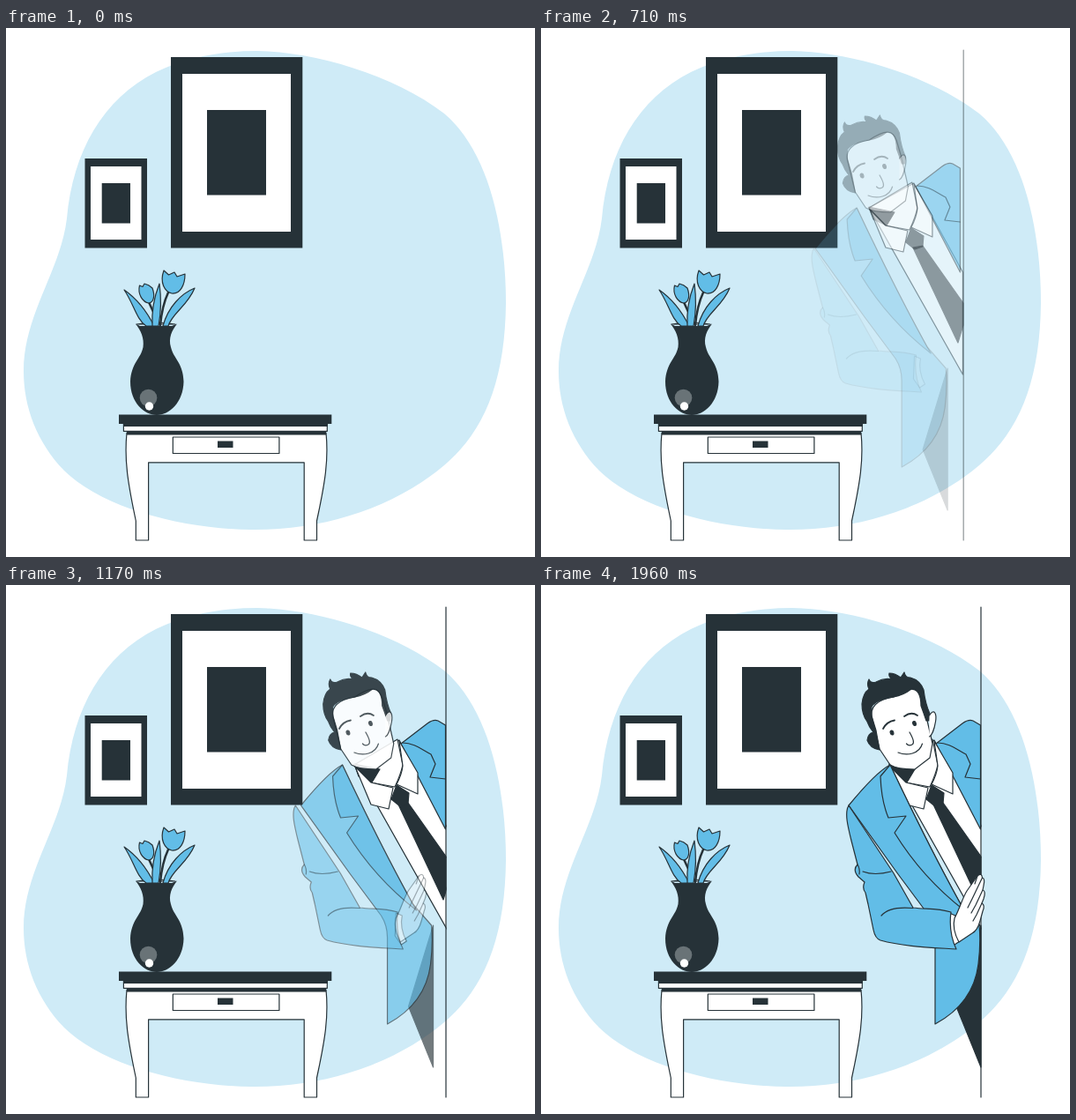
Write an HTML page that moves like this. It is 600 px wide and 600 px high and loops after 2 s.

```html
<!DOCTYPE html>
<html lang="en">
<head>
<meta charset="utf-8">
<title>Peeking in</title>
<style>
  html, body { margin: 0; width: 100%; height: 100%; overflow: hidden; background: #fff; }
  svg { display: block; width: 100vw; height: 100vh; }
  .ink { fill: #263238; }
  .white { fill: #fff; }
  .blue { fill: #62bde7; }
  .line { fill: none; }
  .pen { stroke: #263238; stroke-width: 1.2; stroke-linecap: round; stroke-linejoin: round; }
  .thick { stroke-width: 2.5; }
  .brow { stroke-width: 1.8; }
  .part > * { opacity: var(--alpha); }
</style>
</head>
<body>
<svg viewBox="0 0 600 600">
  <clipPath id="room"><path d="M0 0H499.600V600H0Z"/></clipPath>

  <path fill="#cfebf7" d="M285 26C350 27 440 53 497 97C548 140 567 230 567 312C566 400 543 457 497 496C440 544 360 570 278 569C200 568 110 545 66 502C35 470 20 430 20 389C20 325 62 275 69 216C76 140 110 80 170 50C205 33 245 26 285 26Z"/>

  <!-- pictures -->
  <g class="ink">
    <path d="M187 33H336.300V249.500H187Z"/>
    <path class="white" d="M200 52H323V231H200Z"/>
    <path d="M228 93H295V189.500H228Z"/>
    <path d="M89.500 148H160V249.500H89.500Z"/>
    <path class="white" d="M96 157H153.500V240H96Z"/>
    <path d="M108.700 176H141V221.500H108.700Z"/>
  </g>

  <!-- flowers and vase -->
  <g class="pen blue">
    <path class="white" d="M148 336Q170 332 192 336Z"/>
    <path class="line thick" d="M162 311L168 324M184 300Q177 315 175 337"/>
    <path d="M134 297C150 308 160 322 168 338H159C148 331 145 313 134 297Z"/>
    <path d="M174 290C168 305 165 320 166 338H173C176 322 176 305 174 290Z"/>
    <path d="M214 295C199 301 184 316 178 338H184C188 324 206 315 214 295Z"/>
    <path d="M151.500 292L155 293.500L157 290Q162 291 166 295C169 303 168 311 162 312C155 311 149 302 151.500 292Z"/>
    <path d="M179 275L184.500 280L191 277L194 282L203 279C203 291 198 302 188 301C180 299 174 289 179 275Z"/>
  </g>
  <path class="ink" d="M147 335.500L152 338H188L194 335.500C188 343 184 352 187 362C190 375 201 380 201.500 401C201 425 185 439 171 439C157 439 141 425 141 401C142 380 153 375 155.500 362C157 352 153 343 147 335.500Z"/>
  <circle cx="161.500" cy="419.500" r="9.800" fill="#697377"/>
  <circle class="white" cx="162.500" cy="429" r="4.700"/>

  <!-- table -->
  <g class="pen white">
    <path d="M137 459C134 490 138 515 147.300 559V581H161.600V492.800H338.200V581H352.500V559C362 515 366 490 363 459Z"/>
    <path d="M189.300 464H309.900V482.500H189.300Z"/>
    <path d="M133.400 449H364.300V457.300H133.400Z"/>
  </g>
  <path class="ink" d="M128 438.500H369.300V449H365V452H133V449H128ZM137 457.300H363V461.500H137ZM240 468.500H257.500V476H240Z"/>

  <g clip-path="url(#room)">
    <g id="body" class="part pen">
      <path class="white" d="M395 204L501.500 393V277L446 176Z"/>
      <path class="blue" d="M448 180L478 157Q485 152 490 154L498.500 159V277Z"/>
      <path class="line" d="M450 179C463 179 472 187 482 192L487 203L481 218L498.500 220"/>
      <path class="ink" d="M445 249L456 247L502 312V337L496 357Z"/>
      <path class="ink" d="M443 227L457 236L456 248L447 251L437 243Z"/>
      <path class="white" d="M395 204L414 224L441 229Q448 214 450 204L444 175Z"/>
      <path class="ink" d="M395 203L400 217L415 224L424 209Z"/>
      <path class="white" d="M396 206L414 249L434 254L439 230L414 224Z"/>
      <path class="white" d="M446 177L467 213V237L443 226Q449 215 450 205Z"/>
    </g>
  </g>
  <g id="edge" class="part pen"><path class="line" d="M499 25V581"/></g>

  <g id="head" class="part pen">
    <path class="white" d="M376 153C371 138 382 130 400 127C418 115 427 115 431 128L436 145L442 171L444 180L441 196L424 209Q404 209 396 204L384 186Z"/>
    <path class="ink" d="M364 135Q365 123 372 118Q369 112 372 107Q374 112 380 110Q389 105 398 107Q394 104 395 100Q402 100 408 105L412 99Q413 105 419 105Q430 108 434 119Q436 135 441 146L440 154H437Q434 145 431 137C431 125 427 117 420 118Q411 125 400 127Q380 130 375 138Q374 146 376 152L380 165L384 187Q373 185 370 176Q371 168 377 167Q372 161 370 155Q364 147 364 135Z"/>
  </g>

  <g id="face" class="part pen">
    <path class="white" d="M440.500 148C446 139 449 146 447.500 155C446 164 443 171 440.500 172"/>
    <ellipse class="ink" cx="398" cy="167.500" rx="1.800" ry="2.500" transform="rotate(-15 398 167.500)"/>
    <ellipse class="ink" cx="423.500" cy="157" rx="1.800" ry="2.500" transform="rotate(-15 423.500 157)"/>
    <path class="line brow" d="M388 163Q392 155 401 153.500M412 149Q420 143 427 148"/>
    <path class="line" d="M418 167Q425 179 421 181Q417 183 414.500 180M405 190C415 194 429 192 432.500 180"/>
  </g>

  <g id="jacket" class="part pen">
    <path class="ink" d="M471 478L499 547V386Z"/>
    <path class="blue" d="M396 204C388 208 372 222 349 250L405 328L440 375Q447 386 447 400V498C473 484 492 462 496 430Q499 405 497 386L476 362Q440 297 396 204Z"/>
    <path class="blue" d="M396 204L385 217Q386 245 394 264L414 262L401 281C425 320 453 348 480 369L476 362Q440 297 396 204Z"/>
  </g>

  <g id="arm" class="part pen">
    <path class="white" d="M463 372L470 375Q467 389 475 404L469 408L462 398Z"/>
    <path class="blue" d="M349 250C344 258 348 274 352 290L359 317Q353 323 360 331L367 337Q364 344 368 349L371 362L377 391Q379 401 385 403C410 410 440 411 471 413Q462 394 465 371C448 366 437 368 422 366L400 327L353 256Z"/>
    <path class="line" d="M359 317Q362 322 361 328M365 325Q378 330 397 325M386 375Q395 364 422 366.500"/>
  </g>

  <g id="hand" class="part pen">
    <path class="white" d="M469 378C475 367 478 355 483 347L495 330Q500 326 500.500 332Q504 333 502 341L501 346Q505 347 502 356L500 361Q504 363 501 370L498 381Q495 392 489 395L474 405Q466 390 469 378Z"/>
    <path class="line" d="M500.500 332L489 356L484 366M501 346L493 363L488 372M500 361L494 374L490 381M495 330L492 339"/>
  </g>
</svg>
<script>
  const LOOP = 2000, STEP = LOOP / 48;

  // each part glides in from the left while alpha follows progress ** fade
  const parts = {
    edge:   { start: 0,   time: 988,  shift: 70, fade: 2 },
    body:   { start: 0,   time: 1036, shift: 73, fade: 2 },
    head:   { start: 250, time: 1000, shift: 51, fade: 1.4 },
    face:   { start: 400, time: 960,  shift: 50, fade: 1 },
    jacket: { start: 450, time: 1000, shift: 51, fade: 1.3 },
    arm:    { start: 600, time: 1070, shift: 44, fade: 1.1 },
    hand:   { start: 790, time: 1000, shift: 43, fade: 1 }
  };

  const clamp = v => Math.min(1, Math.max(0, v));
  const begin = performance.now();

  function draw() {
    const elapsed = (performance.now() - begin) % LOOP;
    const t = Math.floor(elapsed / STEP) * STEP;
    for (const [id, { start, time, shift, fade }] of Object.entries(parts)) {
      const p = clamp((t - start) / time);
      const el = document.getElementById(id);
      el.setAttribute("transform", `translate(${-shift * (1 - p)} 0)`);
      el.style.setProperty("--alpha", p ** fade);
    }
    requestAnimationFrame(draw);
  }
  draw();
</script>
</body>
</html>
```
